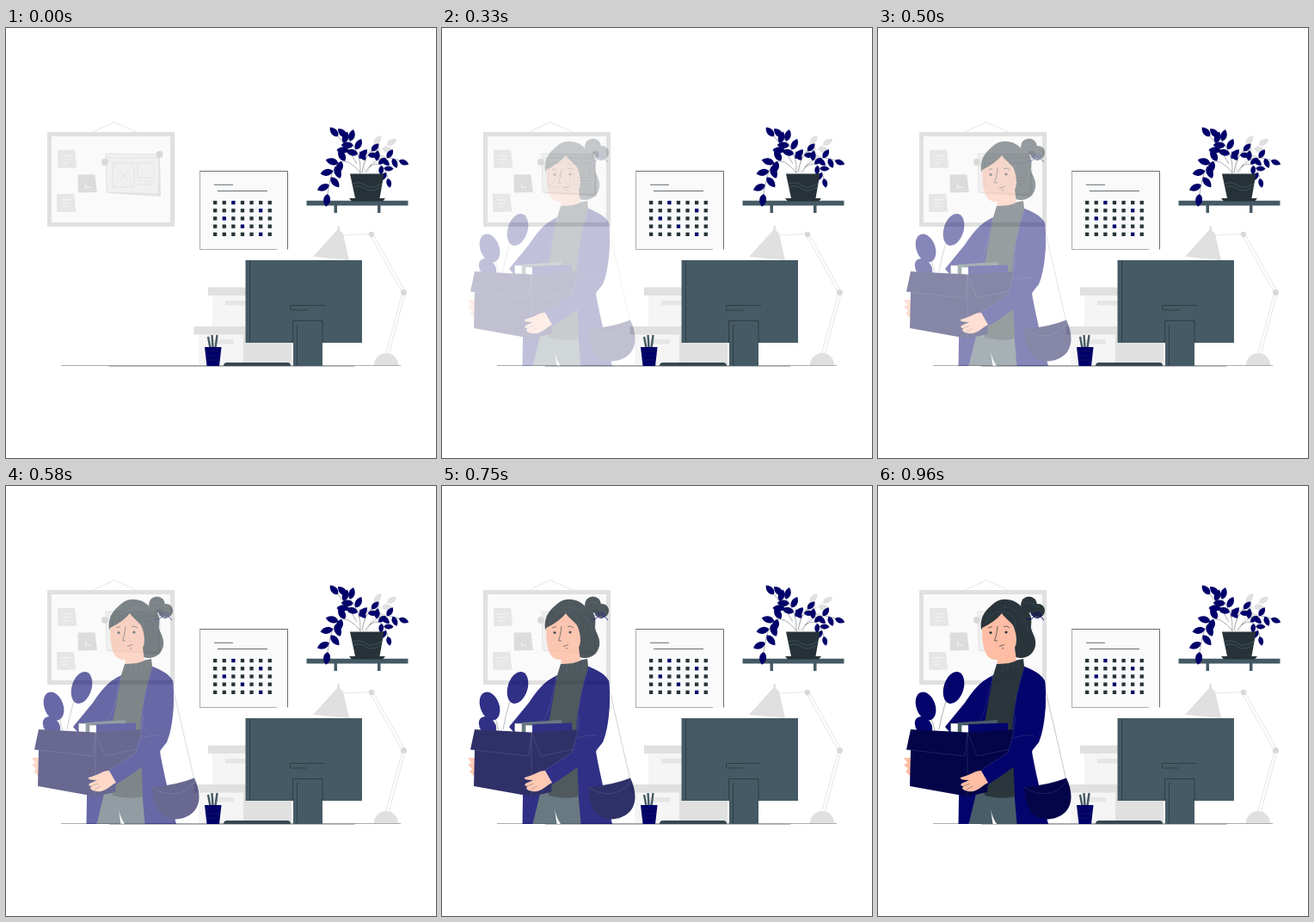
Animation of 500 by 500 pixels, one loop 1 s. Source, as an HTML page:

```html
<!DOCTYPE html>
<html lang="en">
<head>
<meta charset="utf-8">
<title>Leaving the office</title>
<style>
html, body { margin: 0; width: 100%; height: 100%; overflow: hidden; background: #fff; }
svg { display: block; width: 100%; height: 100%; }
.line { fill: none; stroke: #263238; stroke-width: .7; }
.thin { fill: none; stroke: #263238; stroke-width: .4; }
.fold { fill: none; stroke: #46547c; stroke-width: .35; }
.gray { fill: none; stroke: #e0e0e0; stroke-width: .8; }
.navy { fill: #00006b; }
.deep { fill: #000046; }
.ink { fill: #263238; }
.slate { fill: #455a64; }
.skin { fill: #ffbda3; }
.g1 { fill: #e0e0e0; }
.g2 { fill: #f5f5f5; }
.g3 { fill: #fafafa; }
</style>
</head>
<body>
<svg viewBox="0 0 500 500">
  <!-- pin board -->
  <path class="gray" d="M101 121 126 109.500 152 121"/>
  <rect class="g3" x="50.500" y="123.500" width="143" height="105" stroke="#e0e0e0" stroke-width="5"/>
  <g id="notes"></g>
  <path fill="#e3e3e3" d="M118 148 179 149 180 196 118 192Z"/>
  <path fill="#f0f0f0" stroke="#e0e0e0" stroke-width=".8" d="M116 146 178 147 177 193 117 191Z"/>
  <path class="gray" d="M117 151H178M124 157H149V185H124ZL149 185M149 157 124 185M153 157H172V174H153ZM153 178H172M153 182H169"/>
  <g fill="#d9d9d9"><circle cx="115" cy="156" r="4"/><circle cx="178.500" cy="147" r="4"/></g>

  <!-- calendar -->
  <path class="g3" d="M226 166.500H327.500V257.500H226Z"/>
  <path class="line" d="M225.500 166.500H327.500V257.500M242 182.300H264M246 189.500H304"/>
  <path class="thin" d="M225.500 166V257.500H315"/>
  <g id="days"></g>

  <!-- shelf and plants -->
  <path class="slate" d="M349.500 200.700H467.500V206.500H435.500V215H432V206.500H385V215H381.500V206.500H349.500Z"/>
  <g id="plants"></g>
  <path class="ink" d="M400 169.500H439.500L434.500 198H441L438 201.500H402L399 198H406Z"/>
  <path fill="none" stroke="#455a64" stroke-width=".8" d="M403 181Q412 178 418 183T437 181M404 185Q412 182 418 187T436 185"/>

  <!-- lamp -->
  <path class="g1" d="M385 235 386 230H388V235L392 239 399 270 357 266ZM428 392A14 14 0 0 1 456 392Z"/>
  <path class="gray" d="M391 241 425 239.500M423.500 241 461 308 441 380M427 240 464.500 307 445 380"/>
  <g fill="#d9d9d9"><circle cx="425" cy="240" r="3.200"/><circle cx="462.500" cy="307.500" r="3.500"/></g>

  <!-- storage boxes -->
  <path class="g2" d="M240 311H280V347H240ZM224 356H277V392H224Z"/>
  <path class="g1" d="M235 301.500H280V311H235ZM218.500 347H280V356.500H218.500ZM276 356H332V392H276Z"/>
  <path fill="#e6e6e6" d="M255 317H280V322.500H255ZM240 362H265V367.500H240Z"/>

  <!-- desk -->
  <path class="thin" d="M64 392.500H459M120 393.300H405"/>
  <path class="slate" d="M278.500 270H414V366H368V393H334V366H278.500Z"/>
  <path class="line" d="M283.500 271V365M330.500 328V322.500H371M331 328H350M333.500 366V340.500H368V366M338.500 345V392"/>
  <path fill="#37474f" d="M253 393Q253 389 257 389H327Q331 389 331 393Z"/>
  <path fill="none" stroke="#455a64" stroke-width="2.400" d="M237.500 372 235 359M240.500 372 239.500 357M243.500 372 245.500 357"/>
  <path class="navy" d="M231 371H250.500L248 393H233.500Z"/>
  <path class="thin" d="M232 376H249.500M232.500 381H249M233 386H248.500"/>

  <g id="woman" opacity="0">
    <!-- clothes -->
    <path class="thin" opacity=".7" d="M195 238 218.500 340"/>
    <path class="slate" d="M106 352H162V393H106Z"/>
    <path fill="#fff" d="M131 376 133.500 393H138Q133 386 131 376Z"/>
    <path class="navy" d="M134 220C118 227 109 240 101 252L78 280 95 300 93.500 393H105.500L128 300ZM168 209Q190 217 194 227C197 255 194 280 179 309Q184 338 198 393H161.500L150 260Z"/>
    <path class="ink" d="M138 207 169 201 170 210Q156 255 156 290L159 361Q146 365 124 360V275L134 220Z"/>
    <path class="fold" d="M133 222C127 245 127 262 115 277M170 212Q158 245 157 285M146 206 144 216M152 205 150 215M158 204 157 214M164 203V213M180 310Q170 300 166 318"/>

    <!-- head -->
    <path class="ink" d="M120 166C118 150 128 142 134 137C143 128 161 131 168 142C178 146 179 154 178 161C176 169 185 174 183 186C180 198 170 202 160 199L140 190Z"/>
    <circle class="ink" cx="175.500" cy="138" r="9.500"/><circle class="ink" cx="186" cy="145" r="8"/>
    <path class="skin" d="M121 165Q136 158 144 148C149 156 157 158 159 167Q163 180 159 188L161 203Q149 208 138 206.500L139 202C126 203 121 192 121 165Z"/>
    <path class="fold" d="M146 141C159 140 172 153 175 171M125 160Q132 144 146 146T160 165M169 137Q178 132 186 142"/>
    <path fill="none" stroke="#00006b" d="M179 151C181 146 191 146 189 151S179 153 178 147M173 155Q179 156 182 151T193 156"/>
    <path class="line" d="M128 165 133 163.500M146 163.500Q150 162 153 165M139 163Q138 174 135.500 180H139M141 186.500 147 184.500M144 189 146 188.500"/>
    <g class="ink"><circle cx="131" cy="170.500" r="1.600"/><circle cx="149" cy="170" r="1.600"/></g>

    <!-- box and contents -->
    <path class="thin" d="M71 283Q76 254 87 230M66 284Q62 266 54 250M64 285 49 274"/>
    <g class="navy">
      <ellipse rx="11.500" ry="19" transform="translate(88 234.500) rotate(17)"/>
      <ellipse rx="11" ry="17" transform="translate(55.500 256) rotate(-20)"/>
      <ellipse rx="9" ry="12" transform="translate(53 279) rotate(-38)"/>
    </g>
    <path fill="#fff" stroke="#455a64" stroke-width=".6" d="M84.500 276H93V287H84.500ZM97 278H105.500V288H97Z"/>
    <path class="slate" d="M93 275 139 272V276L97 278V287H93Z"/>
    <path class="navy" d="M105 277 151 275.500V287H105Z"/>
    <path class="skin" d="M40 316H30L34 322 30 324 35 329 32 332 40 340Z"/>
    <path class="deep" d="M38 283 104 286.500 158 283V315L128 345 127 356 104 361 37 349 38 307 33 306.500Z"/>
    <path class="fold" d="M33 306.500 101 314 104 286.500V361M104 286.500 115 314 158 305"/>

    <!-- arm and bag -->
    <path class="navy" d="M172 225 194 226C197 255 193 285 187 298Q170 321 128 347L119 331 151 310Q163 270 172 225Z"/>
    <path class="fold" d="M119 331 151 310Q158 290 160 267M181 290Q168 289 157 293"/>
    <path class="skin" d="M120 331C112 331 108 336 96 339Q94 342 106 342L97 346Q95 349 99 349L98 352Q101 355 105 355C115 357 121 348 128 345Z"/>
    <path class="thin" d="M99 349 107 346M103 353 110 349"/>
    <path class="deep" d="M170 350Q198 348 219 339.500C226 354 227 370 218 379C207 390 188 390 179 380Q171 372 170 350Z"/>
    <path class="fold" d="M170 350C185 361 210 362 220 341"/>
  </g>
</svg>
<script>
const $ = id => document.getElementById(id);

function note(x, y, fill, lines) {
  return `<g transform="translate(${x} ${y}) rotate(-1)"><path fill="${fill}" d="M0 0H20L22 21H0Z"/>
    <path fill="none" stroke="#f5f5f5" d="${lines}"/></g>`;
}
const text = 'M4 7H17M5 11H15M6 15H12';
$('notes').innerHTML = note(60, 142, '#e6e6e6', text) + note(59, 193, '#e6e6e6', text) +
  note(83.5, 170.5, '#dcdcdc', 'M9 11V15H15');

const marked = [2, 12, 15, 24, 33];
for (let i = 0; i < 35; i++) {
  const x = 241 + i % 7 * 10.6, y = 200.9 + Math.floor(i / 7) * 9.2;
  $('days').innerHTML += `<rect class="${marked.includes(i) ? 'navy' : 'ink'}" x="${x}" y="${y}" width="4.3" height="4.3"/>`;
}

// A curved stem from a to b, with one leaf at the tip and the rest on alternating sides
function branch(a, c, b, count, size, fill, stroke) {
  let out = `<path class="${stroke}" d="M${a}Q${c} ${b}"/>`;
  for (let i = 0; i < count; i++) {
    const t = 1 - i * .75 / count, s = 1 - t;
    const at = k => s * s * a[k] + 2 * s * t * c[k] + t * t * b[k];
    const slope = k => s * (c[k] - a[k]) + t * (b[k] - c[k]);
    const turn = i ? (i % 2 ? 55 : -55) : 0;
    const angle = Math.atan2(slope(1), slope(0)) * 180 / Math.PI + turn;
    out += `<path class="${fill}" transform="translate(${at(0)} ${at(1)}) rotate(${angle}) scale(${size})"
      d="M0 0C.2-.35 .7-.35 1 0C.7 .35 .2 .35 0 0Z"/>`;
  }
  return out;
}
const pale = (...p) => branch(...p, 13, 'g1', 'gray');
const dark = (...p) => branch(...p, 'navy', 'thin');
$('plants').innerHTML =
  pale([416, 169], [415, 150], [428, 135], 2) +
  pale([420, 169], [428, 145], [443, 136], 4) +
  dark([412, 169], [414, 145], [396, 127], 6, 14) +
  dark([408, 158], [400, 142], [386, 126], 3, 14) +
  dark([412, 168], [382, 132], [374, 193], 8, 15) +
  dark([414, 168], [416, 152], [425, 143], 3, 12) +
  dark([418, 168], [432, 144], [457, 154], 5, 12) +
  dark([422, 162], [438, 150], [444, 175], 5, 11);

// The woman fades in at 24 steps per second, after a short hold
function draw() {
  const k = Math.floor(performance.now() % 1000 * .024 + .1), x = Math.min(k / 25, 1);
  $('woman').setAttribute('opacity', k < 4 ? 0 : x * x * (3 - 2 * x));
  requestAnimationFrame(draw);
}
draw();
</script>
</body>
</html>
```
